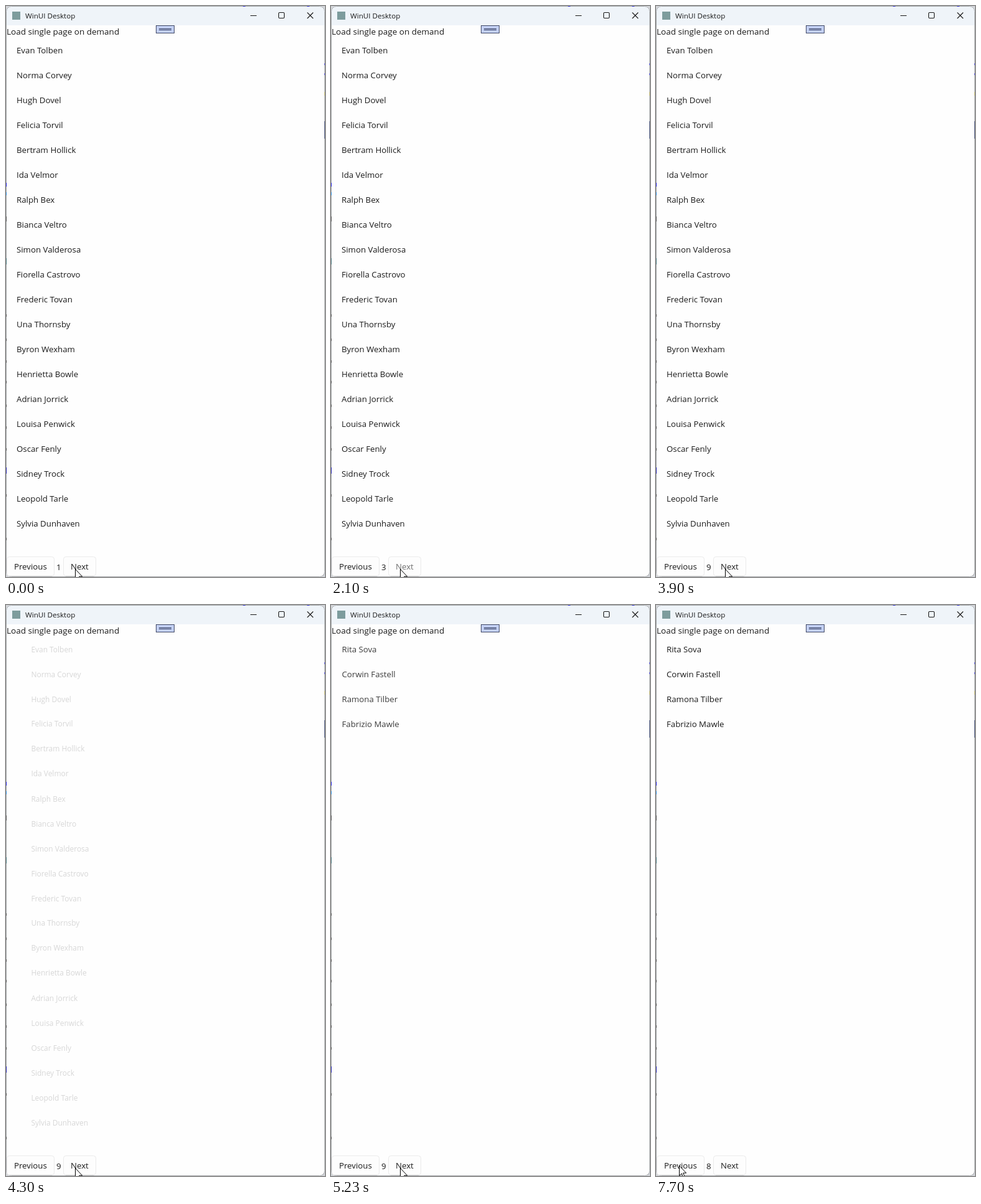
Animation of 513 by 917 pixels, one loop 8000 ms. Source, as an HTML page:

```html
<!DOCTYPE html>
<html lang="en">
<head>
<meta charset="utf-8">
<title>Paged list</title>
<style>
  html, body { margin: 0; width: 100%; height: 100%; overflow: hidden; background: #d0d2d6; }
  svg { display: block; width: 513px; height: 917px; }
  text { font: 13.25px "Open Sans", "Noto Sans", sans-serif; fill: #1b1b1b; white-space: pre; }
  .title { font-size: 11.6px; }
  .heading { font-size: 13.5px; }
  .button { fill: #fdfdfd; stroke: #ebebeb; }
  .icon { fill: none; stroke: #1a1a1a; stroke-width: 1.1; }
</style>
</head>
<body>
<svg viewBox="0 0 513 917">
  <rect x=".5" y=".5" width="512" height="916" rx="8" fill="#fefefe"/>
  <path d="M0 31V8a8 8 0 0 1 8-8H505a8 8 0 0 1 8 8V31Z" fill="#eff4f9"/>
  <rect x=".5" y=".5" width="512" height="916" rx="8" fill="none" stroke="#a3a5a8"/>
  <g id="edges"></g>

  <rect x="10" y="9" width="13" height="13" fill="#7d9c9d"/>
  <text class="title" x="31" y="20">WinUI Desktop</text>
  <path class="icon" d="M393 15.5h10M484.5 10.5l9.5 9.5m0-9.5l-9.5 9.5"/>
  <rect class="icon" x="438.5" y="10.5" width="9" height="9" rx="1.5"/>

  <text class="heading" x="1" y="46">Load single page on demand</text>
  <rect x="241.5" y="31.5" width="29" height="12" fill="#c3d0f4" stroke="#424a66"/>
  <path d="M246 36.5h20M246 38.5h20" stroke="#303a5c"/>

  <g id="list"></g>

  <rect class="button" x="1.5" y="884.5" width="76" height="31" rx="4"/>
  <rect class="button" x="92.5" y="884.5" width="52" height="31" rx="4"/>
  <path d="M5 915.5h69M96 915.5h45" stroke="#d9d9d9"/>
  <text id="prev" x="13" y="905">Previous</text>
  <text id="page" x="81" y="906">1</text>
  <text id="next" x="104" y="905">Next</text>
  <path id="cursor" d="M.5.5V16.5L4.2 13 6.8 19 9.2 18 6.6 12.2H11.6Z" fill="#fff" stroke="#000" stroke-width="1"/>
</svg>
<script>
const LOOP = 8000, FRAME = 200 / 3, CENTER = 256;
const INK = '#1b1b1b', PRESSED = '#6e6e6e', FADING = '#454545';

const firstPage = ['Evan Tolben', 'Norma Corvey', 'Hugh Dovel', 'Felicia Torvil',
  'Bertram Hollick', 'Ida Velmor', 'Ralph Bex', 'Bianca Veltro', 'Simon Valderosa',
  'Fiorella Castrovo', 'Frederic Tovan', 'Una Thornsby', 'Byron Wexham',
  'Henrietta Bowle', 'Adrian Jorrick', 'Louisa Penwick', 'Oscar Fenly',
  'Sidney Trock', 'Leopold Tarle', 'Sylvia Dunhaven'];
const lastPage = ['Rita Sova', 'Corwin Fastell', 'Ramona Tilber', 'Fabrizio Mawle'];

// Each row: start time, then the values held from there on.
const pageSteps = [[0, 1], [630, 2], [1570, 3], [2230, 4], [2570, 5], [2700, 6],
  [2900, 7], [3100, 8], [3430, 9], [7700, 8]];
const nextSteps = [[0, INK], [500, PRESSED], [630, FADING], [700, INK],
  [1430, PRESSED], [1570, INK], [2100, PRESSED], [2230, FADING], [2300, INK],
  [3300, PRESSED], [3430, INK], [3770, PRESSED], [3900, INK]];
const prevSteps = [[0, INK], [7570, PRESSED], [7700, INK]];
// opacity, scale
const firstSteps = [[0, 1, 1], [4230, .6, .96], [4300, .17, .902], [4370, 0, .9]];
const lastSteps = [[0, 0, .9], [5030, .14, .973], [5100, .4, .987], [5170, .64, .994],
  [5230, .85, .998], [5300, 1, 1]];

const $ = id => document.getElementById(id);
const NS = 'http://www.w3.org/2000/svg';

function add(parent, tag, attrs, text = '') {
  const el = document.createElementNS(NS, tag);
  for (const key in attrs) el.setAttribute(key, attrs[key]);
  el.textContent = text;
  return parent.appendChild(el);
}

function at(steps, t) {
  let row = steps[0];
  for (const step of steps) if (step[0] <= t) row = step;
  return row;
}

function makeList(names) {
  const group = add($('list'), 'g', {});
  const items = names.map((name, i) => add(group, 'text', { x: 17, y: 76 + 40 * i }, name));
  return { group, items };
}

// Every row shrinks about its own middle.
function poseList({ group, items }, [, opacity, scale]) {
  group.setAttribute('opacity', opacity);
  items.forEach((item, i) => {
    const y = 71 + 40 * i;
    item.setAttribute('transform',
      `translate(${CENTER} ${y}) scale(${scale}) translate(${-CENTER} ${-y})`);
  });
}

function cursorAt(t) {
  const p = t < 6500 ? 0 : Math.min(1, (Math.floor((t - 6499) / FRAME) + 1) / 12);
  const glide = p - .03 * Math.sin(2 * Math.PI * p);
  return [Math.round(111 - 74 * glide), Math.round(904 - 4 * p - 10 * Math.sin(Math.PI * p))];
}

// Slivers of the desktop showing at the window edge: x, y, width, height, colour.
[[381, 0, 4, 1, '#3030c8'], [484, 0, 4, 1, '#3030c8'], [0, 284, 1, 6, '#2020e0'],
 [0, 299, 1, 5, '#2f8fe0'], [0, 338, 1, 8, '#555'], [0, 405, 1, 10, '#4a7a80'],
 [0, 741, 1, 10, '#2424b0'], [512, 92, 1, 3, '#3a3ac0'], [512, 108, 1, 3, '#3a3ac0'],
 [512, 138, 1, 6, '#b0a860'], [512, 185, 1, 28, '#38456e']]
  .forEach(([x, y, width, height, fill]) => add($('edges'), 'rect', { x, y, width, height, fill }));
for (const y of [497, 536, 571, 604, 642, 677, 712, 786, 856])
  add($('edges'), 'rect', { x: 0, y: y - 2, width: 1, height: 4, fill: '#555' });

const first = makeList(firstPage), last = makeList(lastPage);

function draw(t) {
  $('page').textContent = at(pageSteps, t)[1];
  $('next').style.fill = at(nextSteps, t)[1];
  $('prev').style.fill = at(prevSteps, t)[1];
  poseList(first, at(firstSteps, t));
  poseList(last, at(lastSteps, t));
  $('cursor').setAttribute('transform', `translate(${cursorAt(t)})`);
}

const start = performance.now();
function tick() {
  draw((performance.now() - start) % LOOP);
  requestAnimationFrame(tick);
}
draw(0);
requestAnimationFrame(tick);
</script>
</body>
</html>
```
